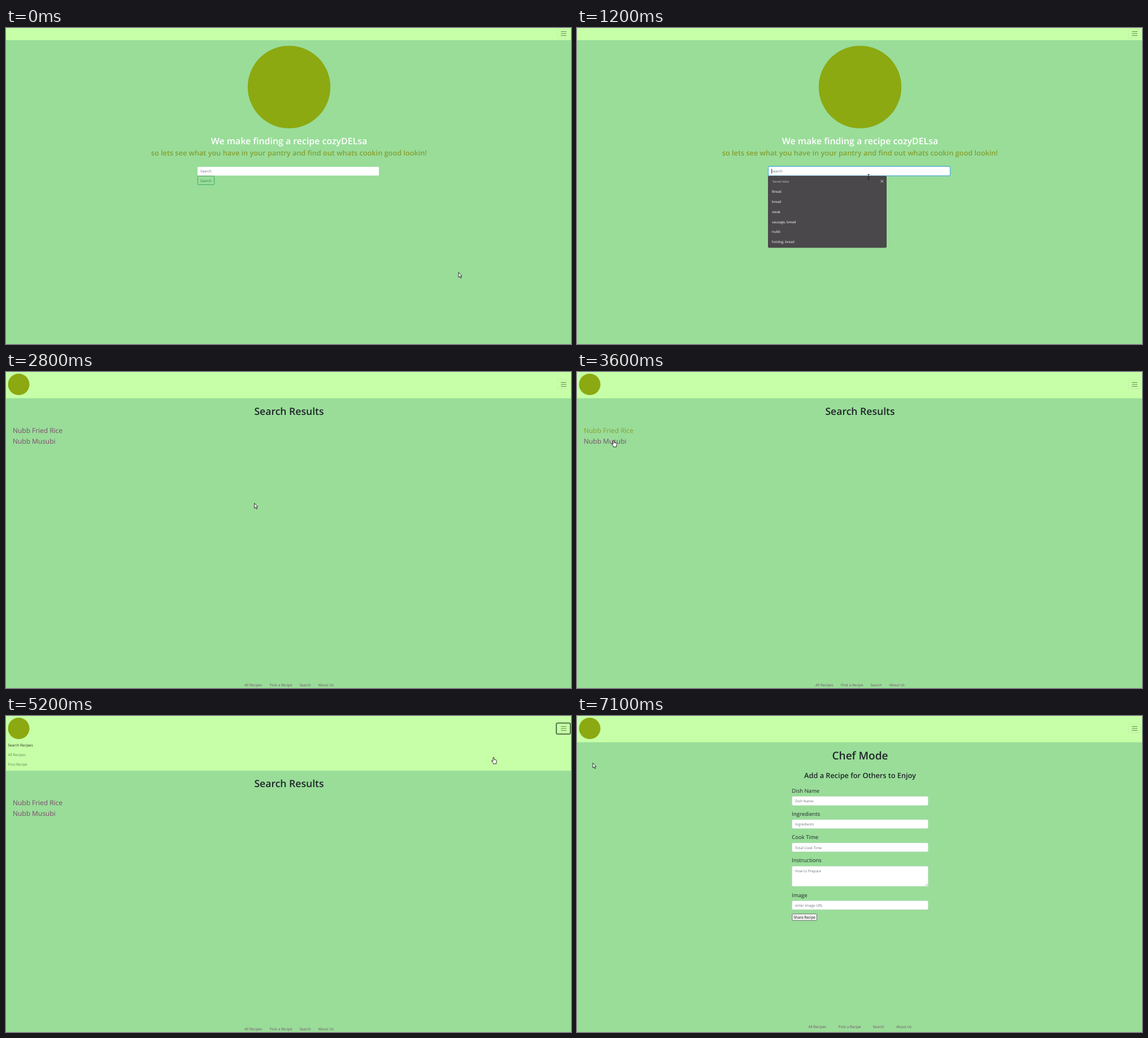
An HTML page with a canvas that plays this animation: 1000x560 px, repeating every 7.2 s.

```html
<!DOCTYPE html>
<html lang="en">
<head>
<meta charset="utf-8">
<title>Recipe search</title>
<style>
  html, body { margin: 0; width: 100%; height: 100%; overflow: hidden; background: #99dd99; }
  canvas { display: block; width: 1000px; height: 560px; }
</style>
</head>
<body>
<canvas id="stage" width="1000" height="560"></canvas>
<script>
const ctx = document.getElementById('stage').getContext('2d');
const LOOP = 7200, STEP = 100;
const FONT = '"Open Sans", "Noto Sans", sans-serif';
const C = {
  page: '#99dd99', bar: '#c7ffa8', pea: '#8ca911', olive: '#84a032',
  plum: '#7b4b6b', ink: '#212529', hint: '#6c757d', menu: '#4a484a'
};

// [time, x, y, pointer]
const PATH = [
  [0, 801, 433, 'arrow'], [200, 770, 408, 'arrow'], [500, 610, 310, 'arrow'],
  [800, 520, 262, 'beam'], [1200, 516, 264, 'beam'], [1600, 516, 264, 'none'],
  [2200, 512, 258, 'arrow'], [2700, 512, 258, 'arrow'], [3200, 150, 130, 'arrow'],
  [3500, 60, 108, 'hand'], [3600, 65, 121, 'hand'], [4100, 68, 122, 'hand'],
  [4200, 330, 108, 'arrow'], [4400, 991, 55, 'arrow'], [4600, 986, 22, 'hand'],
  [4900, 986, 22, 'hand'], [5000, 974, 33, 'hand'], [5100, 930, 62, 'hand'],
  [5200, 863, 73, 'hand'], [5300, 660, 80, 'hand'], [5600, 28, 83, 'hand'],
  [6000, 28, 83, 'arrow'], [LOOP, 28, 83, 'arrow']
];

const clamp = v => Math.max(0, Math.min(1, v));
const ease = v => v * v * (3 - 2 * v);

function text(str, x, y, size, color, align = 'left', weight = 400) {
  ctx.font = `${weight} ${size}px ${FONT}`;
  ctx.textAlign = align;
  ctx.fillStyle = color;
  ctx.fillText(str, x, y);
}

function box(x, y, w, h, r, fill, stroke, line = 1) {
  ctx.beginPath();
  ctx.roundRect(x, y, w, h, r);
  if (fill) { ctx.fillStyle = fill; ctx.fill(); }
  if (stroke) { ctx.strokeStyle = stroke; ctx.lineWidth = line; ctx.stroke(); }
}

function disc(x, y, r) {
  ctx.beginPath();
  ctx.arc(x, y, r, 0, Math.PI * 2);
  ctx.fillStyle = C.pea;
  ctx.fill();
}

function cross(x, y, r, color, width) {
  ctx.beginPath();
  ctx.moveTo(x - r, y - r); ctx.lineTo(x + r, y + r);
  ctx.moveTo(x + r, y - r); ctx.lineTo(x - r, y + r);
  ctx.strokeStyle = color;
  ctx.lineWidth = width;
  ctx.stroke();
}

function header(h, midY, focus = 0) {
  ctx.fillStyle = C.page;
  ctx.fillRect(0, 0, 1000, 560);
  ctx.fillStyle = C.bar;
  ctx.fillRect(0, 0, 1000, h);
  box(975.5, midY - 8, 22.5, 16, 2, null, 'rgba(0,0,0,.05)');
  if (focus) {
    ctx.globalAlpha = focus;
    box(974, midY - 9.5, 25, 19.5, 2.5, null, '#567c48', 2);
    ctx.globalAlpha = 1;
  }
  ctx.fillStyle = '#66854f';
  for (const d of [-3.5, 0, 3.5]) ctx.fillRect(982, midY + d - 0.5, 10, 1);
}

function footer(xs, y) {
  ['All Recipes', 'Post a Recipe', 'Search', 'About Us']
    .forEach((s, i) => text(s, xs[i], y, 6.4, C.plum));
}

function suggestions(items) {
  box(338, 262, 210, 20.7 + items.length * 17.8, 2, C.menu);
  text('Saved data', 346, 273.8, 5.7, '#c4c4c4');
  cross(539.8, 271.6, 2.3, '#e4e4e4', 0.9);
  items.forEach((s, i) => text(s, 345, 292 + i * 17.85, 6.05, '#fff'));
}

function home(t) {
  header(21.5, 10);
  disc(501, 104.6, 73.2);
  text('We make finding a recipe cozyDELsa', 501, 205.7, 15.9, '#fff', 'center', 600);
  text('so lets see what you have in your pantry and find out whats cookin good lookin!',
    500.8, 226, 12.72, C.olive, 'center', 600);

  const focus = t >= 900;
  const typed = 'rice'.slice(0, t < 1600 ? 0 : t < 1700 ? 1 : t < 2000 ? 2 : t < 2100 ? 3 : 4);
  box(339, 246, 321, 15.6, 1.5, '#fff');
  box(339.3, 262.4, 29.4, 15.2, 1.5, null, '#3f9d68', 0.9);
  text('Search', 354, 272.5, 6.35, '#2f8558', 'center');
  if (focus) box(338.5, 245.2, 322, 16.8, 2, '#fff', '#58b3d2', 1.4);
  text(typed || 'Search', 344, 256.2, 6.35, typed ? '#343a40' : C.hint);
  if (focus) {
    const caret = typed ? 344.4 + ctx.measureText(typed).width : 344;
    ctx.fillStyle = '#222';
    ctx.fillRect(caret, 249.5, 0.8, 8.5);
  }
  if (typed) cross(651, 254, 1.6, '#3c5a78', 1.6);
  if (t >= 1000 && t < 2500) {
    const first = 'rice ham egg green onion';
    suggestions(!typed ? ['Bread', 'bread', 'steak', 'sausage, bread', 'nubb', 'hotdog, bread']
      : typed.length < 4 ? [first, 'rice'] : [first]);
  }
}

function results(t) {
  const open = ease(clamp((t - 4800) / 350));
  const dy = 50.4 * open;
  header(46.5 + dy, 22, clamp((t - 4800) / 200));
  disc(22.5, 22, 19);
  if (open) {
    ctx.save();
    ctx.beginPath();
    ctx.rect(0, 0, 1000, 46.5 + dy);
    ctx.clip();
    text('Search Recipes', 3.5, 54.3, 6.35, '#1f2a1a');
    text('All Recipes', 3.5, 71, 6.35, '#638054');
    text('Post Recipe', 3.5, 87.8, 6.35, t >= 5300 ? '#3c4d33' : '#638054');
    ctx.restore();
  }
  text('Search Results', 501, 75.6 + dy, 17.6, C.ink, 'center', 600);
  text('Nubb Fried Rice', 12, 107.8 + dy, 11.95, t >= 3500 && t < 3700 ? C.olive : C.plum);
  text('Nubb Musubi', 12, 126.8 + dy, 11.95, t >= 3700 && t < 4200 ? C.olive : C.plum);
  footer([422, 467, 519.5, 552.5], 557.3);
  if (t >= 3700 && t < 4600) {
    box(-2, 552.3, 256.5, 12, 2, '#56705a', '#49614c', 0.6);
    text('https://polar-garden-31604.herokuapp.com/cozydelsa/recipe/61f70cbda1c95c9b62ff5d53',
      1, 559.6, 5.95, '#f1f5f1');
  }
}

function chef() {
  header(46.5, 22);
  disc(22.5, 22, 19);
  text('Chef Mode', 501, 76.6, 19.05, C.ink, 'center', 600);
  text('Add a Recipe for Others to Enjoy', 501, 109.7, 12.72, C.ink, 'center', 600);
  const fields = [
    ['Dish Name', 'Dish Name', 142.6, 15.8],
    ['Ingredients', 'Ingredients', 183.8, 15.5],
    ['Cook Time', 'Total Cook Time', 225, 15.5],
    ['Instructions', 'How to Prepare', 266.2, 35.6],
    ['Image', 'enter image URL', 327.6, 15.5]
  ];
  for (const [label, hint, y, h] of fields) {
    text(label, 380.3, y - 6.8, 9.5, C.ink);
    box(380.6, y, 240.8, h, 1.8, '#fff', '#ced4da', 0.4);
    text(hint, 386, y + 10.6, 6.35, C.hint);
  }
  ctx.beginPath();
  ctx.moveTo(616.5, 301); ctx.lineTo(620.5, 297);
  ctx.moveTo(619, 301); ctx.lineTo(620.5, 299.5);
  ctx.strokeStyle = '#777';
  ctx.lineWidth = 0.6;
  ctx.stroke();
  box(380.9, 350.7, 43.6, 11.6, 1, '#efefef', '#6f756f', 1);
  text('Share Recipe', 402.7, 358.9, 6.4, '#111', 'center');
  footer([409.4, 462.8, 523.6, 565], 553.2);
}

const SHAPES = {
  arrow: new Path2D('M0 0V9L2.1 7.1L3.6 10.4L5 9.8L3.6 6.6H6Z'),
  hand: new Path2D('M-1 .8Q0 -.6 1 .8V4.2L4.6 5Q5.7 5.4 5.5 6.8L4.6 10V11.8H-.6V10.4L-3.4 7Q-3.7 5.6 -2.5 5.9L-1 7.2Z'),
  beam: new Path2D('M-1.8 -4.5H1.8M0 -4.5V4M-1.8 4H1.8')
};

function pointer(t) {
  let i = 0;
  while (i < PATH.length - 2 && t >= PATH[i + 1][0]) i++;
  const [t0, x0, y0, kind] = PATH[i], [t1, x1, y1] = PATH[i + 1];
  const shape = SHAPES[kind];
  if (!shape) return;
  const k = (t - t0) / (t1 - t0);
  ctx.save();
  ctx.translate(x0 + (x1 - x0) * k, y0 + (y1 - y0) * k);
  ctx.lineJoin = 'round';
  ctx.lineWidth = 0.9;
  ctx.strokeStyle = '#1c1c1c';
  ctx.fillStyle = '#fff';
  if (kind !== 'beam') ctx.fill(shape);
  ctx.stroke(shape);
  ctx.restore();
}

function draw(now) {
  const t = Math.floor((now % LOOP) / STEP) * STEP;
  ctx.textRendering = 'geometricPrecision';
  if (t < 2600) home(t);
  else if (t < 6000) results(t);
  else chef();
  pointer(t);
}

let start;
function tick(now) {
  start ??= now;
  draw(now - start);
  requestAnimationFrame(tick);
}
draw(0);
requestAnimationFrame(tick);
</script>
</body>
</html>
```
